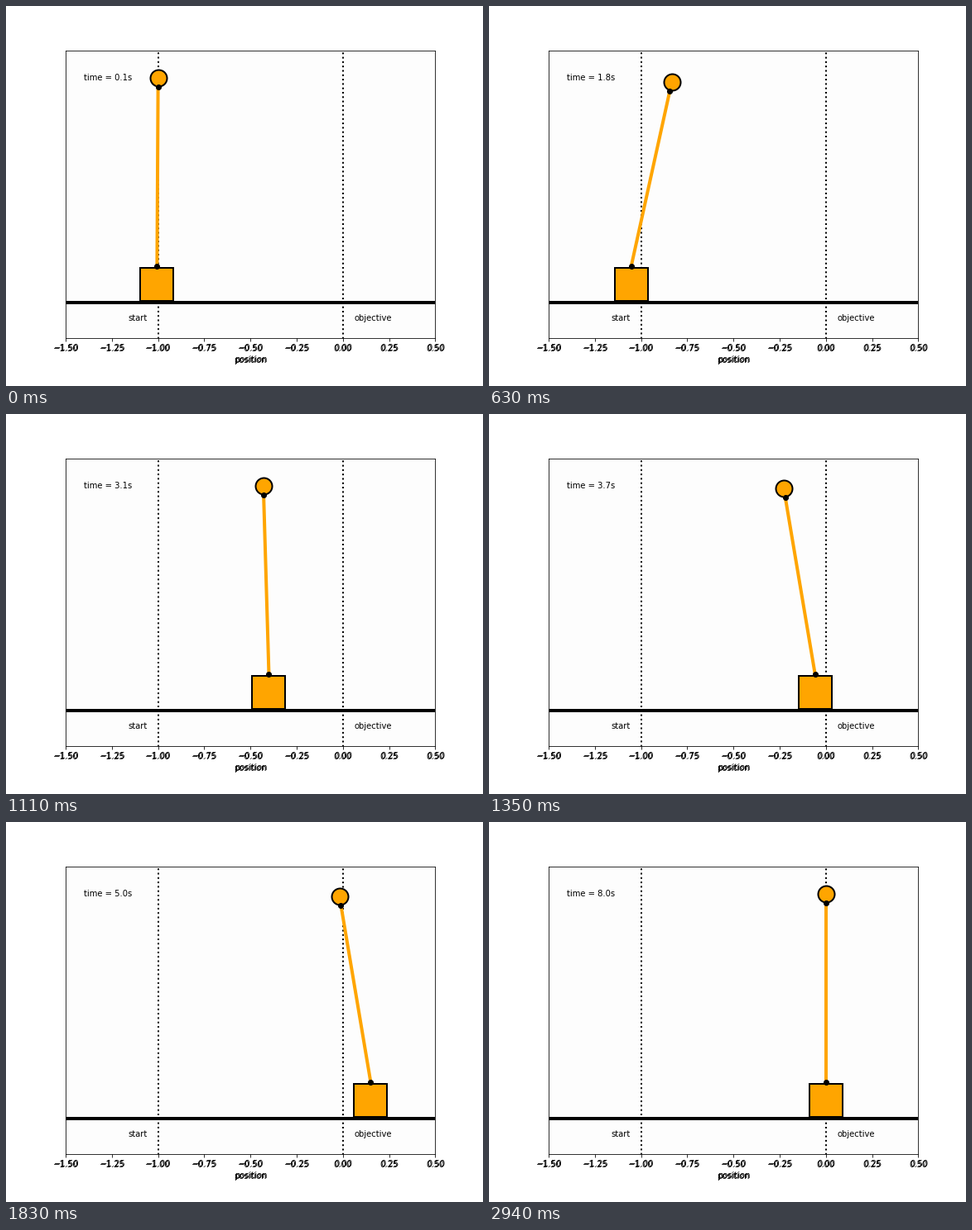
A matplotlib script that plays this animation: 576x460 px, repeating every 2970 ms.

```python
import numpy as np
import matplotlib.pyplot as plt
from matplotlib.animation import FuncAnimation

W, H, DPI = 576, 460, 72
LEFT, BOTTOM, WIDTH, HEIGHT = 72, 57.6, 446.4, 347.904  # axes box in pixels
plt.rcParams.update({"font.family": "DejaVu Sans", "font.size": 10})

# Least-effort move of a linear cart-pole from x = -1 to rest at x = 0,
# stepped with implicit Euler.
POINTS, END = 100, 74
time = np.linspace(0, 8, POINTS)
h = time[1]
eps = 1 / 11  # pole mass / total mass
A = np.array([[0, 1, 0, 0],
              [0, 0, -eps, 0],
              [0, 0, 0, 1],
              [0, 0, 1, 0]])
B = np.array([0, 1, 0, -1])
step = np.linalg.inv(np.eye(4) - h * A)
push = step @ B * h


def solve():
    start = np.array([-1.0, 0, 0, 0])
    reach = np.column_stack([np.linalg.matrix_power(step, END - 1 - k) @ push
                             for k in range(END)])
    drift = np.linalg.matrix_power(step, END) @ start
    force = np.linalg.pinv(reach) @ -drift
    states = np.zeros((POINTS, 4))
    states[0] = start
    for k in range(END):
        states[k + 1] = step @ states[k] + push * force[k]
    states[END:] = 0
    return states[:, 0], states[:, 2]


cart_x, angle = solve()

fig = plt.figure(figsize=(W / DPI, H / DPI), dpi=DPI, facecolor="white")


def add_axes(shift, pad):
    box = [(LEFT + shift) / W, BOTTOM / H, WIDTH / W, HEIGHT / H]
    ax = fig.add_axes(box, xlim=(-1.5, 0.5), ylim=(-0.4, 1.2))
    ax.set_xticks(np.arange(-1.5, 0.51, 0.25))
    ax.tick_params(pad=pad)
    ax.set_xlabel("position")
    ax.yaxis.set_visible(False)
    return ax


ax = add_axes(0, 4.3)
ax.set_facecolor("#fdfdfd")

# The axis labels appear twice, slightly apart.
ghost = add_axes(1, 3.5)
ghost.set_frame_on(False)
ghost.tick_params(width=0)

ax.plot([-1.5, 0.5], [-0.2, -0.2], "k-", lw=4)
ax.plot([-1, -1], [-1.5, 1.5], "k:", lw=2)
ax.plot([0, 0], [-0.5, 1.5], "k:", lw=2)
ax.text(-1.06, -0.3, "start", ha="right")
ax.text(0.06, -0.3, "objective", ha="left")

body = dict(ls="None", color="orange", mec="k", mew=2)
cart, = ax.plot([], [], marker="s", ms=40, **body)
bob, = ax.plot([], [], marker="o", ms=20, **body)
pole, = ax.plot([], [], "o-", color="orange", lw=4, ms=6, mec="k", mfc="k")
clock = ax.text(0.05, 0.8977, "", transform=ax.transAxes)


def draw(frame):
    i = frame + 1
    x, s, c = cart_x[i], np.sin(angle[i]), np.cos(angle[i])
    cart.set_data([x], [-0.1])
    bob.set_data([x + 1.05 * s], [1.05 * c])
    pole.set_data([x, x + s], [0, c])
    clock.set_text(f"time = {time[i]:.1f}s")
    return cart, bob, pole, clock


anim = FuncAnimation(fig, draw, frames=POINTS - 1, interval=30,
                     repeat=True, repeat_delay=0, blit=False)
plt.show()
```
